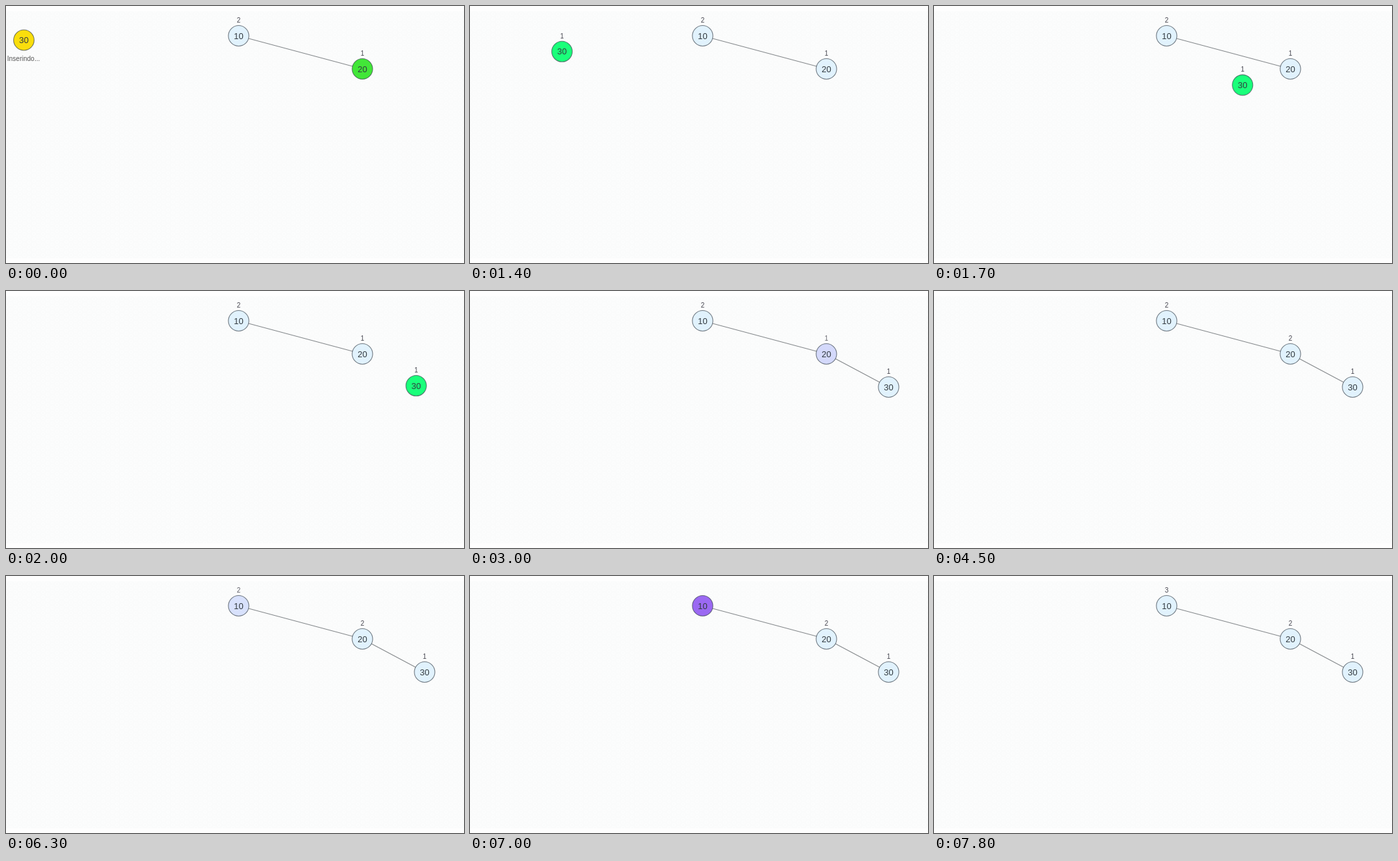
These frames come from a looping animation (692 by 388 pixels, 8 s). An HTML page with a canvas:

```html
<!DOCTYPE html>
<html lang="pt">
<head>
<meta charset="utf-8">
<style>
html, body { margin: 0; width: 100%; height: 100%; overflow: hidden; background: #fefefe; }
canvas { display: block; }
</style>
</head>
<body>
<canvas id="stage" width="692" height="388"></canvas>
<script>
const ctx = document.getElementById('stage').getContext('2d');
const LOOP = 8000;
const BLUE = [225, 242, 253], PURPLE = [155, 105, 242];
const GREEN = [66, 230, 56], SPRING = [26, 255, 122], YELLOW = [250, 222, 12];
const ROOT = [351.5, 45], CHILD = [538.5, 95], LEAF = [632.5, 145], START = [27, 51.5];

const mix = (a, b, k) => a.map((v, i) => v + (b[i] - v) * k);

// Quadratic ease-out progress from start over duration
function easeOut(t, start, duration) {
  const k = Math.min(1, Math.max(0, (t - start) / duration));
  return 1 - (1 - k) ** 2;
}

function makeBackground() {
  const tile = document.createElement('canvas');
  tile.width = 14;
  tile.height = 8;
  const c = tile.getContext('2d');
  c.fillStyle = '#fafbfb';
  c.fillRect(0, 0, 14, 8);
  c.strokeStyle = 'rgba(255,255,255,.6)';
  for (const [x, y] of [[0, 0], [14, 0], [7, 4], [0, 8], [14, 8]]) {
    c.beginPath();
    c.arc(x, y, 2.5, 0, 7);
    c.stroke();
  }
  return ctx.createPattern(tile, 'repeat');
}
const background = makeBackground();

function text(str, x, y, size, color, alpha = 1) {
  ctx.globalAlpha = alpha;
  ctx.font = size + 'px "Liberation Sans", Arial, sans-serif';
  ctx.textAlign = 'center';
  ctx.fillStyle = color;
  ctx.fillText(str, x, y);
  ctx.globalAlpha = 1;
}

function edge(a, b) {
  ctx.strokeStyle = '#868a8d';
  ctx.lineWidth = 1.2;
  ctx.beginPath();
  ctx.moveTo(...a);
  ctx.lineTo(...b);
  ctx.stroke();
}

function node([x, y], value, fill, height, alpha) {
  ctx.beginPath();
  ctx.arc(x, y, 15.5, 0, 7);
  ctx.fillStyle = `rgb(${fill.map(Math.round)})`;
  ctx.fill();
  ctx.strokeStyle = 'rgba(60,70,80,.7)';
  ctx.lineWidth = 1.1;
  ctx.stroke();
  text(value, x, y + 4.5, 13, '#333b40');
  if (height) text(height, x, y - 20, 10, '#45454f', alpha);
}

// Highlights a node, swaps its height label, then restores it
function update(t, start, swap, end, before) {
  if (t >= end) return [BLUE, before + 1, 1];
  const glow = easeOut(t, start, 792);
  const fill = mix(BLUE, PURPLE, glow);
  return t < swap ? [fill, before, 1 - glow] : [fill, before + 1, easeOut(t, swap, 600)];
}

function draw(t) {
  ctx.fillStyle = '#fefefe';
  ctx.fillRect(0, 0, 692, 388);
  ctx.fillStyle = background;
  ctx.fillRect(0, 8, 692, 373);

  const linked = t >= 2924, moving = t >= 1324;
  edge(ROOT, CHILD);
  if (linked) edge(CHILD, LEAF);

  node(ROOT, 10, ...update(t, 6250, 7140, 7800, 2));
  const [fill, height, alpha] = update(t, 2924, 3830, 4500, 1);
  node(CHILD, 20, t < 500 ? GREEN : fill, height, alpha);

  const leafFill = linked ? BLUE : moving ? SPRING : YELLOW;
  node(mix(START, LEAF, easeOut(t, 1324, 792)), 30, leafFill, moving ? 1 : 0, 1);
  if (!moving) text('Inserindo...', 26.5, 83, 10, '#555');
}

function frame() {
  draw(performance.now() % LOOP);
  requestAnimationFrame(frame);
}
frame();
</script>
</body>
</html>
```
